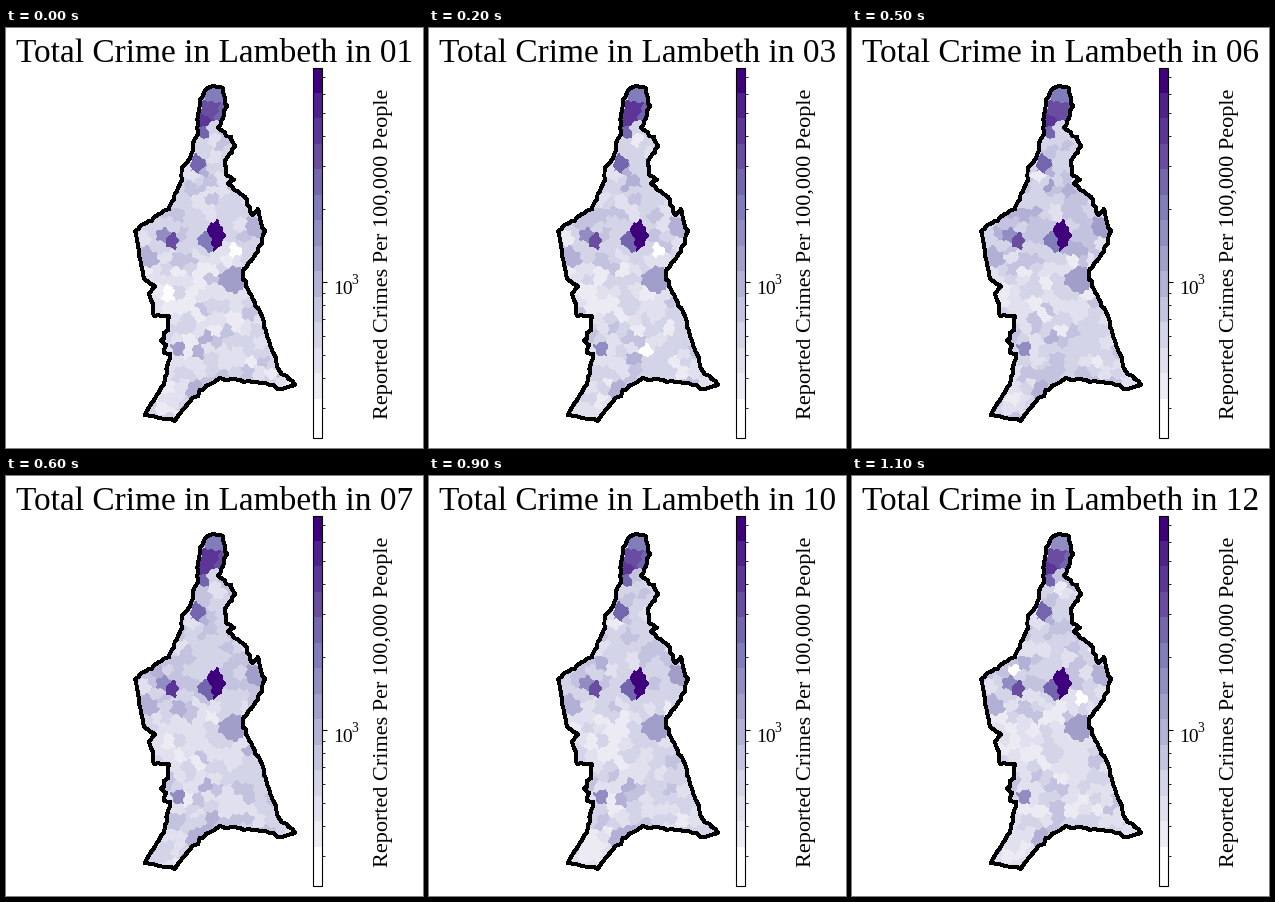
Recreate the animation shown at these times as a matplotlib script. Size 417x420 px, loop 1200 ms.

```python
import numpy as np
import matplotlib.pyplot as plt
from matplotlib.animation import FuncAnimation
from matplotlib.colors import BoundaryNorm, ListedColormap
from matplotlib.patches import Polygon, Rectangle

W, H, DPI = 417, 420, 100
MONTHS = 12
plt.rcParams["font.family"] = "Liberation Serif"
rng = np.random.default_rng(17)

# Corners of the borough in pixels, clockwise from the top
CORNERS = [
    (207, 58), (217, 60), (221, 78), (212, 100), (225, 109), (229, 118),
    (219, 133), (220, 147), (228, 152), (222, 156), (239, 169), (246, 187),
    (252, 181), (259, 203), (252, 223), (238, 241), (237, 251), (243, 264),
    (257, 291), (264, 317), (273, 342), (289, 357), (276, 361), (255, 355),
    (214, 350), (200, 358), (180, 378), (169, 393), (139, 387), (158, 356),
    (164, 326), (158, 325), (160, 317), (155, 313), (162, 302), (163, 288),
    (148, 288), (143, 266), (149, 258), (138, 251), (129, 203), (163, 181),
    (176, 152), (176, 140), (184, 130), (191, 100), (194, 72), (199, 62),
]

# Standout areas: x, y, radius, position on the log colour scale
SPOTS = [
    (207, 66, 8, .61), (204, 81, 8, .78), (214, 85, 4, .72), (197, 92, 4, .84),
    (197, 104, 2, .70), (191, 137, 5, .68), (165, 211, 3, .78),
    (158, 207, 4, .55), (213, 204, 3, .99), (210, 214, 3, .99),
    (201, 216, 4, .66), (227, 252, 11, .49), (249, 199, 6, .45),
    (172, 321, 5, .54), (188, 362, 6, .42), (142, 231, 6, .42),
]

# One-month changes: month, x, y, position there
EVENTS = [
    (1, 167, 271, .05), (1, 228, 227, .05), (3, 215, 323, .05),
    (3, 228, 227, .05), (8, 142, 231, .60), (12, 228, 227, .05),
    (12, 160, 190, .05),
]


def ragged(corners, step=4, rough=.7):
    """Split every side into short pieces and shake the new points."""
    points = []
    for a, b in zip(corners, corners[1:] + corners[:1]):
        a, b = np.array(a, float), np.array(b, float)
        n = max(1, round(np.hypot(*(b - a)) / step))
        points.append(a)
        points += [a + (b - a) * k / n + rng.normal(0, rough, 2)
                   for k in range(1, n)]
    return points


def jittered_grid(step):
    for y in np.arange(58, 396, step):
        for x in np.arange(126, 294, step):
            yield (x, y) + rng.uniform(-.42, .42, 2) * step


border = ragged(CORNERS)
spots = np.array(SPOTS)
free = np.array([p for p in jittered_grid(11.5)
                 if (np.hypot(*(spots[:, :2] - p).T) > spots[:, 2] + 4).all()])
sites = np.vstack([spots[:, :2], free])
radius = np.append(spots[:, 2], np.zeros(len(free)))

# Quiet areas: darker in the middle, paler in the south-west
fx, fy = free.T
plain = (.25 + .06 * np.exp(-((fy - 180) / 50) ** 2)
         - .06 * np.exp(-((fx - 170) ** 2 + (fy - 272) ** 2) / 900))
plain = np.clip(plain + rng.normal(0, .05, len(free)), .14, .45)
base = np.append(spots[:, 3], plain)
spread = np.append(np.full(len(spots), .01), np.full(len(free), .035))
noise = rng.normal(0, 1, (MONTHS, len(sites))) * spread

# Each pixel belongs to its nearest site; a slight warp makes ragged edges
gx, gy = np.meshgrid(np.arange(W) + .5, np.arange(H) + .5)
wx = gx + np.sin(.75 * gy + .2 * gx)
wy = gy + np.sin(.8 * gx - .25 * gy)
cells = np.zeros((H, W), int)
best = np.full((H, W), np.inf)
for i, ((x, y), r) in enumerate(zip(sites, radius)):
    d = (wx - x) ** 2 + (wy - y) ** 2 - r ** 2
    near = d < best
    cells[near], best[near] = i, d[near]


def month_map(month):
    season = .015 * np.cos(2 * np.pi * (month - 7) / MONTHS)
    values = np.clip(base + noise[month - 1] + season, .12, .995)
    for when, x, y, level in EVENTS:
        if when == month:
            values[cells[y, x]] = level
    return values[cells]


# Stepped colour scale with a wide white foot
purples = plt.get_cmap("Purples")
edges = np.append(0, np.linspace(.105, 1, 14))
shades = purples((edges[:-1] + edges[1:]) / 2)
shades[0], shades[-1] = 1, purples(1.0)

fig = plt.figure(figsize=(W / DPI, H / DPI), dpi=DPI, facecolor="white")
ax = fig.add_axes([0, 0, 1, 1])
ax.set(xlim=(0, W), ylim=(H, 0))
ax.axis("off")

image = ax.imshow(month_map(1), cmap=ListedColormap(shades),
                  norm=BoundaryNorm(edges, len(shades)), aspect="auto",
                  extent=(0, W, H, 0), interpolation="nearest")
outline = Polygon(border, fill=False, ec="black", lw=2.1, joinstyle="round",
                  antialiased=False)
ax.add_patch(outline)
image.set_clip_path(outline)

# Colour bar
LEFT, RIGHT, TOP, BOTTOM = 307.5, 316.5, 39.5, 409.5
THOUSAND, DECADE = 253.9, 242
for lo, hi, shade in zip(edges, edges[1:], shades):
    y0, y1 = (BOTTOM - (BOTTOM - TOP) * e for e in (lo, hi))
    ax.add_patch(Rectangle((LEFT, y1), RIGHT - LEFT, y0 - y1, fc=shade, lw=0,
                           antialiased=False))
ax.add_patch(Rectangle((LEFT, TOP), RIGHT - LEFT, BOTTOM - TOP, fill=False,
                       ec="black", lw=.8))
for value in [*range(300, 1000, 100), *range(1000, 8000, 1000)]:
    y = THOUSAND - DECADE * np.log10(value / 1000)
    size, lw = (4.9, .8) if value == 1000 else (2.8, .6)
    ax.plot([RIGHT, RIGHT + size], [y, y], color="black", lw=lw,
            solid_capstyle="butt")
ax.text(327, 266.5, "10", size=14)
ax.text(345.8, 256, "3", size=9.8)
ax.text(382, 225.8, "Reported Crimes Per 100,000 People", size=16, rotation=90,
        rotation_mode="anchor", ha="center", va="baseline")
title = ax.text(208.5, 34, "", size=24, ha="center", va="baseline")


def update(i):
    month = i + 1
    image.set_data(month_map(month))
    title.set_text(f"Total Crime in Lambeth in {month:02d}")
    return image, title


anim = FuncAnimation(fig, update, frames=MONTHS, interval=100, repeat=True,
                     repeat_delay=0)
plt.show()
```
